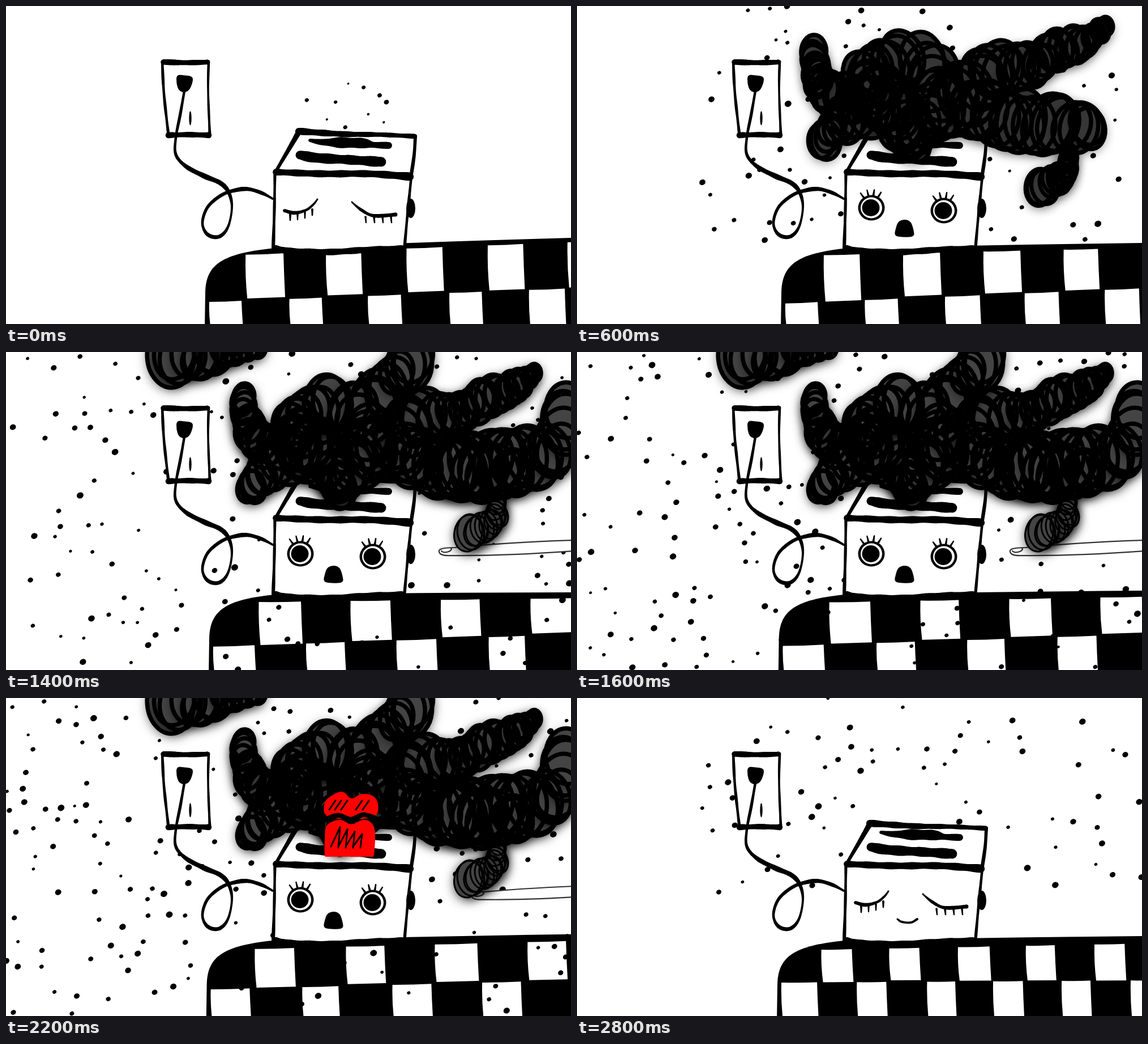
An HTML page with a canvas that plays this animation: 998 px wide and 561 px high, repeating every 3 s.

```html
<!DOCTYPE html>
<html lang="en">
<head>
<meta charset="utf-8">
<title>Toaster</title>
<style>
html, body { margin: 0; width: 100%; height: 100%; overflow: hidden; background: #fff; }
canvas { display: block; width: 100%; height: 100%; }
</style>
</head>
<body>
<canvas id="stage" width="998" height="561"></canvas>
<script>
const c = document.getElementById('stage').getContext('2d');
const STEP = 200, STEPS = 15, TAU = Math.PI * 2;
const W = 998, H = 561;
const LAST = STEPS - 1;

const mix = (a, b, t) => a + (b - a) * t;

function seeded(seed) {
  let s = seed * 7919 + 17;
  return () => {
    s = (s + 0x6D2B79F5) | 0;
    let t = Math.imul(s ^ (s >>> 15), 1 | s);
    t = (t + Math.imul(t ^ (t >>> 7), 61 | t)) ^ t;
    return ((t ^ (t >>> 14)) >>> 0) / 4294967296;
  };
}

function oval(x, y, rx, ry = rx, color = '#000', turn = 0) {
  c.fillStyle = color;
  c.beginPath();
  c.ellipse(x, y, rx, ry, turn, 0, TAU);
  c.fill();
}

function spline(a, b, d, e, t) {
  return 0.5 * (2 * b + (d - a) * t + (2 * a - 5 * b + 4 * d - e) * t * t + (3 * b - a - 3 * d + e) * t * t * t);
}

// Visits a smooth path through x, y, size triples; gap(size) is the stride.
function walk(p, gap, visit) {
  const n = p.length / 3;
  const get = (i, k) => p[Math.max(0, Math.min(n - 1, i)) * 3 + k];
  for (let i = 0; i < n - 1; i++) {
    const len = Math.hypot(get(i + 1, 0) - get(i, 0), get(i + 1, 1) - get(i, 1));
    const m = Math.ceil(len / gap(get(i, 2)));
    for (let j = 0; j < m + (i === n - 2); j++) {
      const at = k => spline(get(i - 1, k), get(i, k), get(i + 1, k), get(i + 2, k), j / m);
      visit(at(0), at(1), at(2));
    }
  }
}

function ink(...p) {
  c.fillStyle = '#000';
  c.beginPath();
  walk(p, () => 1, (x, y, w) => {
    const r = Math.max(0.6, w / 2 * (1 + 0.07 * Math.sin(x * 0.16 + y * 0.11)));
    c.moveTo(x + r, y);
    c.arc(x, y, r, 0, TAU);
  });
  c.fill();
}

function shape(color, ...p) {
  c.fillStyle = color;
  c.beginPath();
  for (let i = 0; i < p.length; i += 2) c.lineTo(p[i], p[i + 1]);
  c.closePath();
  c.fill();
}

// Closed blob smoothed through edge midpoints.
function blob(color, ...p) {
  const n = p.length;
  c.fillStyle = color;
  c.beginPath();
  c.moveTo((p[n - 2] + p[0]) / 2, (p[n - 1] + p[1]) / 2);
  for (let i = 0; i < n; i += 2) {
    const j = (i + 2) % n;
    c.quadraticCurveTo(p[i], p[i + 1], (p[i] + p[j]) / 2, (p[i + 1] + p[j + 1]) / 2);
  }
  c.fill();
}

/* ---------- tablecloth ---------- */
// step, left side, first white check, check period, right top, seam height
const clothKeys = [
  [0, 351, 425, 142, 409, 520], [3, 360, 434, 142, 418, 523], [5, 359, 440, 193, 418, 514],
  [7, 358, 448, 160, 424, 518], [10, 351, 438, 160, 415, 514], [13, 359, 442, 160, 420, 508],
  [14, 353, 433, 120, 420, 500]
];

function clothPose(step) {
  const i = Math.max(1, clothKeys.findIndex(k => k[0] >= step));
  const [a, b] = [clothKeys[i - 1], clothKeys[i]];
  return a.map((v, k) => mix(v, b[k], (step - a[0]) / (b[0] - a[0]))).slice(1);
}

function drawCloth(step) {
  const [left, start, period, right, seamLeft] = clothPose(step);
  const rnd = seeded(step + 1), jitter = size => (rnd() - 0.5) * size;
  const top = x => mix(431, right, (x - 430) / 568);
  const seam = x => mix(seamLeft, 496, (x - 360) / 638);
  const edge = 7.5 + step * 0.4, skew = 3;

  c.fillStyle = '#000';
  c.beginPath();
  c.moveTo(left, H + 9);
  c.lineTo(left + 1, 505);
  c.bezierCurveTo(left + 2, 455, left + 32, 437, 470, top(470) - 2);
  c.quadraticCurveTo(720, top(720) - 3, W, top(W));
  c.lineTo(W, H + 9);
  c.fill();

  const check = (a, b, up, down) => {
    const lift = jitter(4);
    c.fillStyle = '#fff';
    c.beginPath();
    c.moveTo(a, up(a));
    c.quadraticCurveTo((a + b) / 2, up((a + b) / 2) + 1, b, up(b));
    c.quadraticCurveTo(b + 1, (up(b) + down(b)) / 2, b + skew, down(b) + lift);
    c.lineTo(a + skew, down(a) + lift);
    c.quadraticCurveTo(a - 1, (up(a) + down(a)) / 2, a, up(a));
    c.fill();
  };
  const white = period * 0.44;
  for (let x = start; x < W; x += period)
    check(x + jitter(4), x + white + jitter(6), x => top(x) + edge, seam);
  for (let x = start - period / 2; x < W; x += period) {
    const first = x < start;
    check(first ? left + 8 : x + 3 + jitter(5), first ? start - 9 : x + white + jitter(6), x => seam(x) + 2, () => H + 9);
  }
}

/* ---------- crumbs ---------- */
const reach = [105, 330, 325, 382, 402, 570];

function crumbCloud(step) {
  if (step === 0) return { rx: 105, ry: 100, floor: 250, count: 17 };
  if (step === LAST) return { rx: 410, ry: 330, floor: 350, count: 75 };
  return {
    rx: reach[step] || 800,
    ry: step < 3 ? 113 + step * 35 : 600,
    floor: step < 3 ? 300 : step < 5 ? 416 : H,
    count: step < 6 ? 20 + step * 25 : 130 + step * 8
  };
}

function drawCrumbs(step) {
  const { rx, ry, floor, count } = crumbCloud(step);
  const rnd = seeded(step + 40), placed = [];
  const small = step === 0 ? 0.75 : 1;
  for (let tries = 0; placed.length < count && tries < 6000; tries++) {
    const x = 600 + (rnd() * 2 - 1) * rx, y = rnd() * floor;
    if (x < 0 || x > W || Math.hypot((x - 600) / rx, (y - 235) / ry) > 1) continue;
    if (placed.some(p => Math.hypot(p[0] - x, p[1] - y) < 20 * small)) continue;
    placed.push([x, y]);
    const r = (2.4 + 3.3 * rnd()) * small;
    oval(x, y, r * 1.08, r * 0.95, '#000', -0.5);
  }
}

/* ---------- outlet, cord, toaster ---------- */
function drawOutlet() {
  shape('#fff', 276, 97, 358, 97, 360, 229, 287, 229);
  ink(278, 99, 10, 320, 100, 9, 356, 99, 9);
  ink(287, 228, 10, 320, 227, 9, 358, 228, 10);
  ink(276, 98, 5, 279, 155, 5, 287, 228, 5);
  ink(358, 98, 5, 357, 150, 4, 360, 228, 5);
  blob('#000', 301, 121, 314, 122, 330, 124, 330, 134, 324, 149, 314, 153, 305, 149, 301, 137);
  oval(325.5, 198, 2.2, 12.5);
  ink(315, 150, 5, 308, 190, 5, 300, 232, 5, 300, 262, 5, 318, 283, 7, 350, 300, 9, 378, 312, 8,
    393, 328, 7, 399, 355, 4, 392, 390, 5, 376, 407, 7, 356, 403, 6, 347, 383, 5, 356, 355, 5,
    380, 334, 6, 405, 325, 7, 428, 323, 7, 452, 330, 6, 471, 340, 4);
}

function drawToaster() {
  shape('#fff', 475, 292, 517, 222, 724, 229, 716, 300, 704, 429, 570, 434, 472, 427);
  ink(477, 291, 5, 500, 252, 7, 518, 221, 10);
  ink(517, 221, 12, 595, 226, 10, 660, 227, 8, 722, 230, 8);
  ink(723, 230, 6, 721, 262, 6, 716, 297, 6);
  ink(477, 293, 11, 560, 296, 12, 640, 296, 12, 713, 301, 14);
  ink(475, 293, 5, 474, 360, 5, 472, 427, 6);
  ink(716, 300, 5, 709, 370, 5, 704, 425, 5);
  ink(477, 427, 11, 500, 432, 11, 570, 434, 11, 640, 430, 11, 700, 428, 11);
  ink(537, 237, 6, 556, 240, 10, 590, 241, 18, 630, 242, 17, 650, 245, 11, 676, 246, 12);
  ink(519, 263, 16, 550, 268, 18, 600, 271, 16, 663, 275, 18);
  oval(715, 357, 8, 17);
}

/* ---------- face ---------- */
function closedEyes() {
  ink(492, 361, 6, 510, 365, 6, 530, 360, 5, 543, 350, 4, 550, 341, 3);
  ink(611, 346, 3, 628, 360, 5, 650, 370, 6, 688, 368, 7);
  for (let i = 0; i < 4; i++) {
    const xl = 502 + 13 * i, yl = 368 - i * i, xr = 635 + 15 * i;
    ink(xl, yl, 4, xl, yl + 10, 2.5);
    ink(xr, 372, 4, xr + 1, 382, 2.5);
  }
}

function openEye(x, y, half, tilt) {
  for (let i = 0; i < 4; i++) {
    const a = (i - 1.6) * 0.4, s = Math.sin(a), k = -Math.cos(a);
    ink(x + s * 22, y + k * 22, 4, x + s * 32, y + k * 32, 2.5);
  }
  oval(x, y, 23.5, 22.5);
  if (!half) {
    oval(x, y, 19, 18.5, '#fff');
    oval(x - 1, y, 15.5, 15);
    return;
  }
  c.save();
  c.beginPath();
  c.ellipse(x, y, 20.5, 19.5, 0, 0, TAU);
  c.clip();
  shape('#fff', x - 25, y + tilt, x + 25, y - tilt, x + 25, y + 30, x - 25, y + 30);
  c.restore();
}

function drawFace(step) {
  if (step === 0 || step === LAST) {
    closedEyes();
    if (step) ink(566, 390, 3, 574, 395, 4, 590, 396, 4, 601, 390, 4);
    return;
  }
  const half = step === 1 || step === 10;
  openEye(520, 356, half, 1);
  openEye(648, 361, half, 3);
  if (step > 1) blob('#000', 567, 380, 579, 376, 590, 380, 595, 396, 596, 407, 578, 408, 560, 406, 563, 392);
}

/* ---------- smoke ---------- */
// Each arm is a coil along x, y, radius points.
const arms = [
  [520, 160, 50, 448, 160, 38, 424, 118, 33, 417, 82, 30],
  [545, 170, 58, 470, 200, 44, 434, 240, 32],
  [592, 242, 36, 560, 180, 56, 508, 128, 46, 575, 92, 50],
  [600, 215, 44, 640, 165, 62, 610, 100, 52],
  [650, 170, 58, 705, 145, 64, 730, 115, 52, 800, 108, 40, 850, 78, 38, 900, 62, 30, 934, 36, 16],
  [700, 180, 52, 780, 205, 56, 855, 210, 52, 905, 212, 40]
];
const drip = [868, 262, 20, 862, 298, 25, 816, 322, 32];
const plumes = [
  [286, 4, 54, 340, 8, 46, 395, -8, 34, 440, -12, 24],
  [640, 110, 60, 690, 40, 46, 722, 15, 46],
  [790, 205, 60, 880, 195, 56, 960, 180, 56, 995, 105, 54]
];

function coil(points, pen, fill, rnd) {
  const rings = [];
  walk(points, r => Math.max(5, r * 0.3), (x, y, r) => {
    const k = 0.82 + 0.22 * rnd();
    rings.push([x + (rnd() - 0.5) * r * 0.2, y + (rnd() - 0.5) * r * 0.2, r * k * 0.75, r * k, (rnd() - 0.5) * 0.9]);
  });
  return { rings, pen, fill };
}

function drawSmoke(step) {
  if (step === 0 || step === LAST) return;
  const held = step >= 7 && step <= 11;
  const rnd = seeded(held ? 7 : step);
  const grown = Math.min(1, step / 3);
  const fill = held ? '#444' : step > 11 ? '#161616' : '#363636';
  const coils = arms.concat(held ? plumes : []).map(a => coil(a, 7.5, fill, rnd));
  coils.push(coil(drip, held ? 3 : 7, fill, rnd));

  c.save();
  c.translate(600, 240);
  c.scale(grown, grown);
  c.translate(-600, -240);
  c.save();
  c.shadowColor = held ? 'rgba(0,0,0,.55)' : 'rgba(0,0,0,.3)';
  c.shadowBlur = 20;
  c.shadowOffsetY = 5;
  for (const k of coils)
    for (const [x, y, rx, ry, turn] of k.rings) oval(x, y, rx, ry, k.fill, turn);
  c.restore();
  c.strokeStyle = '#000';
  for (const k of coils) {
    c.lineWidth = k.pen;
    for (const ring of k.rings) {
      c.beginPath();
      c.ellipse(...ring, 0, TAU);
      c.stroke();
    }
  }
  c.restore();
}

/* ---------- knife, toast, sparks ---------- */
function drawKnife(step) {
  if (step < 5 || step === LAST) return;
  const x = 765 + Math.max(0, (7 - step) * 65, (step - 10) * 57);
  const y = 352 - (x - 765) * 0.06;
  c.fillStyle = '#fff';
  c.strokeStyle = '#333';
  c.lineWidth = 2.2;
  c.beginPath();
  c.moveTo(1004, 332);
  c.quadraticCurveTo((x + 1000) / 2, 336, x + 28, y - 7);
  c.quadraticCurveTo(x - 2, y - 7, x, y);
  c.quadraticCurveTo(x + 1, y + 8, x + 20, y + 7);
  c.quadraticCurveTo((x + 1000) / 2, y + 8, 1004, 351);
  c.fill();
  c.stroke();
  c.beginPath();
  c.ellipse(x + 13, y - 3, 9, 4, -0.2, -0.4, Math.PI);
  c.stroke();
}

function drawToast(step) {
  if (step < 9 || step > 11) return;
  c.save();
  c.beginPath();
  c.rect(540, 0, 140, 280);
  c.clip();
  c.translate(0, step === 9 ? 45 : 0);
  blob('#f00', 562, 212, 561, 184, 574, 172, 596, 162, 609, 181, 626, 168, 650, 171, 659, 188, 655, 212, 609, 214);
  for (const x of [571, 581, 592, 618, 630]) ink(x, 197, 3, x + 11, 181, 3);
  blob('#f00', 562, 300, 563, 240, 565, 222, 592, 212, 609, 226, 632, 212, 650, 222, 653, 245, 648, 300);
  ink(566, 214, 9, 588, 207, 9, 609, 215, 10, 632, 206, 9, 655, 214, 9);
  for (let i = 0; i < 4; i++) {
    const x = 574 + i * 13, y = 228 + i * 4;
    ink(x, 262, 3, x + 16, y, 3);
    ink(x + 16, y, 3, x + 13, 264, 3);
  }
  c.restore();
}

function petals(x, y, count, length, turn, color, pen, rnd) {
  c.strokeStyle = color;
  c.lineWidth = pen;
  for (let i = 0; i < count; i++) {
    const len = length * (0.88 + 0.3 * rnd());
    c.save();
    c.translate(x, y);
    c.rotate(turn + (i + 0.3 * (rnd() - 0.5)) * TAU / count);
    c.beginPath();
    c.moveTo(0, 0);
    c.bezierCurveTo(len * 0.7, len * 0.2, len * 1.15, len * 0.17, len, 0);
    c.bezierCurveTo(len * 0.9, -len * 0.15, len * 0.5, -len * 0.1, 0, 0);
    c.stroke();
    c.restore();
  }
}

function drawSparks(step) {
  if (step < 12 || step === LAST) return;
  const rnd = seeded(5), size = step === 12 ? 0.6 : 1;
  for (let i = 0; i < 36; i++) {
    const x = 850 - 380 * rnd() ** 1.4, y = 60 + 185 * rnd();
    oval(x, y, 2 + 2.8 * rnd(), undefined, '#fff');
  }
  oval(809, 217, 8.5, 8.5, '#fff');
  for (const x of [583, 701]) {
    petals(x, 160, 8, 65 * size, -1.8, '#e08b27', 5.5, rnd);
    petals(x, 157, 7, 42 * size, -2.1, '#f00', 7, rnd);
  }
}

/* ---------- scene ---------- */
const layers = [drawCloth, drawCrumbs, drawKnife, drawOutlet, drawToaster, drawFace, drawSmoke, drawToast, drawSparks];

function draw(step) {
  c.fillStyle = '#fff';
  c.fillRect(0, 0, W, H);
  c.lineCap = c.lineJoin = 'round';
  for (const layer of layers) layer(step);
}

let shown = -1;
function tick() {
  const step = Math.floor(performance.now() / STEP) % STEPS;
  if (step !== shown) draw(shown = step);
  requestAnimationFrame(tick);
}
tick();
</script>
</body>
</html>
```
